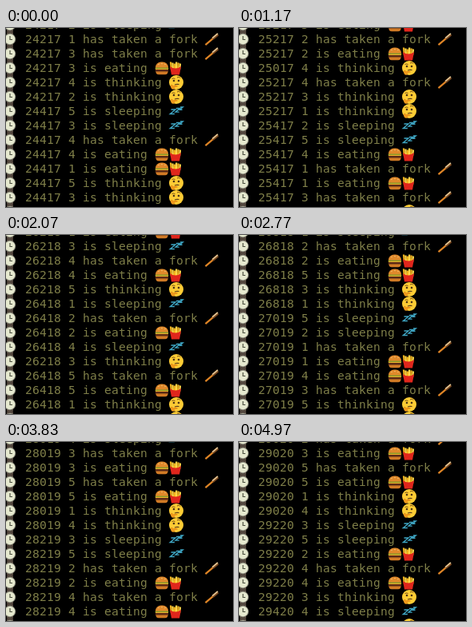
Write an HTML page with a canvas that moves like this. It is 284x224 px and loops after 5010 ms.

```html
<!DOCTYPE html>
<html lang="en">
<head>
<meta charset="utf-8">
<title>Dining philosophers log</title>
<style>
  html, body { margin: 0; width: 100%; height: 100%; overflow: hidden; background: #000; }
  canvas { display: block; }
</style>
</head>
<body>
<canvas id="stage" width="284" height="224"></canvas>
<script>
const ctx = document.getElementById('stage').getContext('2d');
const LOOP = 5010, STEP = 200, LAST = 25;
const ROW = 18, CELL = 9, LEFT = 24, FULL_ROWS = 13;

// One entry per 200 ms burst: philosopher + action; "-" or "+" shifts the stamp
// by one burst. A bare pair of diners expands to a complete burst.
const BURSTS = [
  '2s1f3f3e4t2t', '5s3s4f4e1e5t3t', '35', '24', '13',
  '1s3s5e2f2e-4t4f3t1t', '2s5s4e1f1e3f', '35', '24', '35',
  '5s1e3s4f4e5t', '1s2f2e4s-3t5f5e1t', '13', '3s1s2f2e5e3t1t',
  '5s2s1f1e4e3f5t', '35', '3s5s4f4e2e5t3t', '4s2s5f5e3f3e1f4t',
  '14', '35', '24', '2s3f3e1f1e5f4s', '3s-2t-4t2f2e1s4f5e',
  '14', '1s4s2f3e5f5e1t4t', '3s5s2e4f4e3t+4s', '13'
];

const ACTIONS = {
  f: ['has taken a fork', stick],
  e: ['is eating', meal],
  s: ['is sleeping', snore],
  t: ['is thinking', thinker]
};

const SHIFT = { '-': -1, '': 0, '+': 1 };
const stamp = b => 24217 + 200 * b + Math.floor(b / 7);

const log = [], ends = [], state = {};

// Sleepers wake, diners fall asleep, then the given pair eats.
function expand(pair) {
  const those = act => Object.keys(state).filter(who => state[who] === act);
  return those('s').map(who => `-${who}t`).join('') +
    those('e').map(who => who + 's').join('') +
    [...pair].map(who => `${who}f${who}e`).join('');
}

BURSTS.forEach((entry, b) => {
  const burst = /^\d\d$/.test(entry) ? expand(entry) : entry;
  for (const [, shift, who, act] of burst.matchAll(/([-+]?)(\d)(\w)/g)) {
    const [words, icon] = ACTIONS[act];
    state[who] = act;
    log.push({ text: `${stamp(b + SHIFT[shift])} ${who} ${words}`, icon });
  }
  ends.push(log.length);
});

function disc(x, y, r, color) {
  ctx.fillStyle = color;
  ctx.beginPath();
  ctx.arc(x, y, r, 0, 7);
  ctx.fill();
}

function box(x, y, w, h, r, color) {
  ctx.fillStyle = color;
  ctx.beginPath();
  ctx.roundRect(x, y, w, h, r);
  ctx.fill();
}

function line(color, width, ...pts) {
  ctx.strokeStyle = color;
  ctx.lineWidth = width;
  ctx.beginPath();
  for (let i = 0; i < pts.length; i += 2) ctx.lineTo(pts[i], pts[i + 1]);
  ctx.stroke();
}

// Icons are drawn in an 18 px square centred on the origin.
function watch() {
  box(-4, -9, 8, 18, 1, '#54483f');
  disc(0, 0, 7.2, '#8f8f80');
  disc(0, 0, 6.2, '#e6e9cf');
  line('#4c5040', 1.2, 0, -4, 0, 0.5, 3, 0.5);
}

function thinker() {
  disc(0, 0, 9, '#fdcc35');
  disc(-3, -2, 1.3, '#4d3517');
  disc(3, -2, 1.3, '#4d3517');
  line('#7a5216', 1, -5.5, -4.5, -3.2, -5, -1.5, -4.4);
  line('#7a5216', 1, 1, -6, 3.3, -6.7, 5.3, -5.4);
  line('#5a3c1c', 1.1, -2, 3, 1, 2.2, 3.5, 2.6);
  line('#e58b16', 2, -6, 6.5, -5.4, 3);
  line('#e58b16', 1.8, -4, 5.2, 1.5, 4.6);
  disc(-4, 6.4, 2.4, '#ef9a1d');
}

function snore() {
  const z = (x, y, s) =>
    line('#3fa6c4', 1.4, x, y, x + s, y, x - s * 0.2, y + s, x + s * 0.8, y + s);
  z(-6.5, -2, 5.5);
  z(0, -3.5, 4.6);
  z(5, -5, 3.2);
}

function burger() {
  box(-8, -7.5, 16, 8.5, [7, 7, 1, 1], '#e0892b');
  box(-8.4, -0.6, 16.8, 2, 1, '#8a9a28');
  box(-8, 1, 16, 1.4, 0, '#f0b12c');
  box(-8.2, 2, 16.4, 3, 1.2, '#5a2a16');
  box(-7.6, 4.6, 15.2, 3.6, [0, 0, 4, 4], '#d07a25');
  for (const x of [-4, 0, 4]) disc(x, -4.4 - (x === 0), 0.6, '#fbe0a0');
}

function fries() {
  for (let i = 0; i < 6; i++)
    line(i % 2 ? '#ffd94a' : '#f7b51c', 2.2, i * 2 - 5, 2, i * 2.4 - 6, -7.5 + (i % 3));
  ctx.fillStyle = '#e0261c';
  ctx.beginPath();
  ctx.moveTo(-7, -2);
  ctx.quadraticCurveTo(0, 3, 7, -2);
  ctx.lineTo(5, 8.5);
  ctx.lineTo(-5, 8.5);
  ctx.fill();
}

function meal() {
  burger();
  ctx.translate(ROW - 1, 0);
  fries();
}

function stick() {
  line('#df8526', 2.2, -8.5, 7.2, 3, -2.6);
  line('#7d4a20', 3.6, 0.5, -0.6, 7, -6.2);
  line('#e3c898', 1.6, 0.2, -1.4, 7, -7.2);
}

function place(icon, x, y) {
  ctx.save();
  ctx.translate(x, y);
  icon();
  ctx.restore();
}

function draw() {
  const burst = Math.min(LAST, Math.floor(performance.now() % LOOP / STEP) + 1);
  const first = ends[burst] - FULL_ROWS;
  ctx.fillStyle = '#000';
  ctx.fillRect(0, 0, 284, 224);
  ctx.font = '11pt "DejaVu Sans Mono", monospace';
  // The rows above and below the stage are partly visible.
  for (let i = 0; i <= FULL_ROWS; i++) {
    const { text, icon } = log[first + i], y = 14 + (i - 1) * ROW;
    ctx.fillStyle = '#7e7e48';
    [...text].forEach((ch, col) => ctx.fillText(ch, LEFT + col * CELL, y + 5));
    place(watch, 5, y);
    place(icon, LEFT + (text.length + 2) * CELL, y);
  }
  requestAnimationFrame(draw);
}
draw();
</script>
</body>
</html>
```
